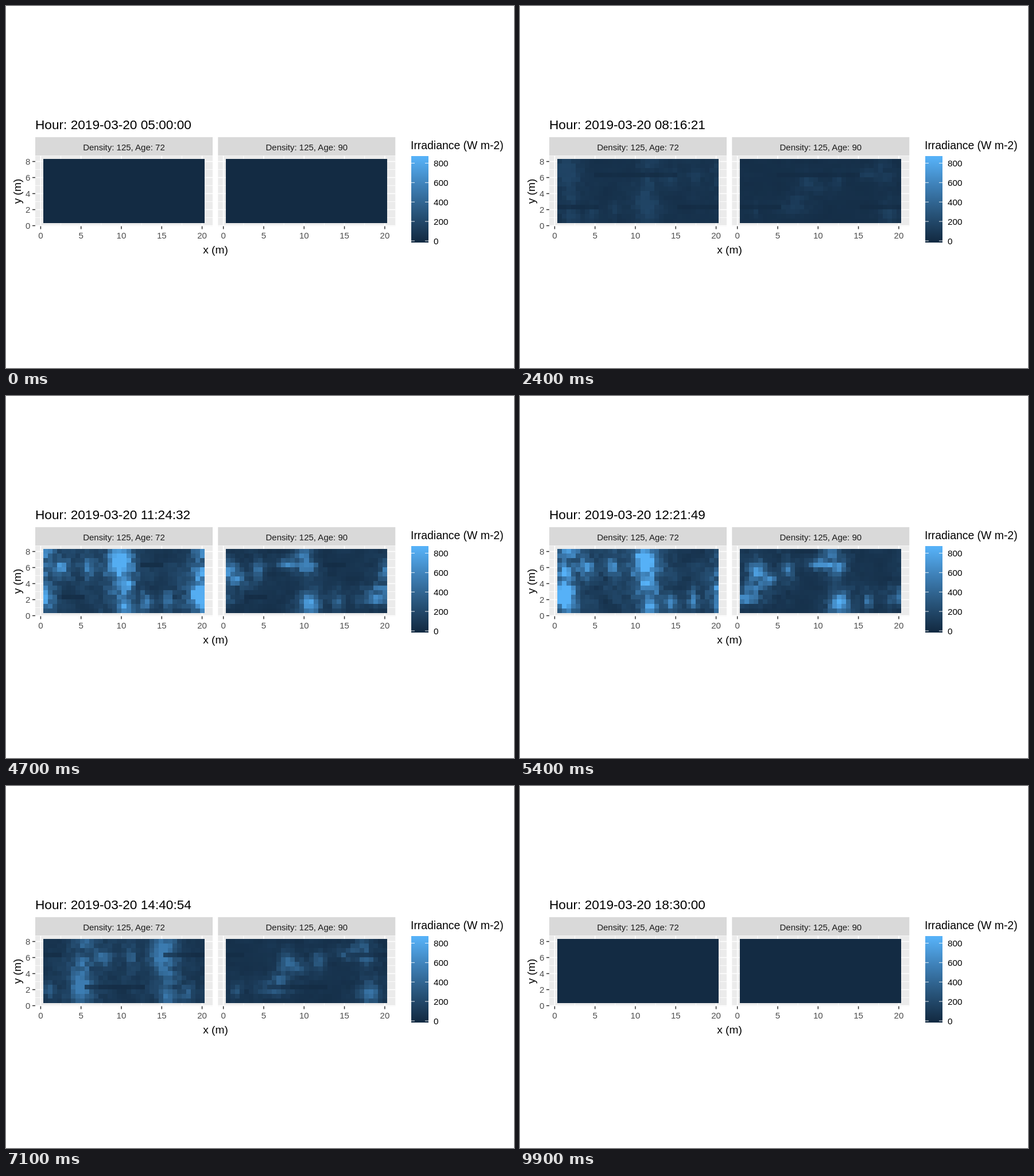
Recreate the animation shown at these times as an HTML page with a canvas. Size 885 by 632 pixels, loop 10000 ms.

```html
<!DOCTYPE html>
<html lang="en">
<head>
<meta charset="utf-8">
<title>Irradiance by hour</title>
<style>
  html, body { margin: 0; width: 100%; height: 100%; overflow: hidden; background: #fff; }
  svg, canvas { position: absolute; }
  svg { left: 0; top: 0; font-family: "Liberation Sans", Arial, sans-serif; }
  canvas { top: 267px; width: 281px; height: 112px; image-rendering: pixelated; }
  #young { left: 65px; }
  #old { left: 383px; }
  .tick { font-size: 15.1px; fill: #4d4d4d; }
  .strip { font-size: 15px; fill: #1a1a1a; }
  .key { font-size: 15.3px; }
  .label { font-size: 19.2px; }
  .mid { text-anchor: middle; }
  .end { text-anchor: end; }
</style>
</head>
<body>
<svg id="plot" width="885" height="632" viewBox="0 0 885 632">
  <defs>
    <linearGradient id="ramp" x1="0" y1="1" x2="0" y2="0">
      <stop offset="0.02" stop-color="#132b43"/>
      <stop offset="0.34" stop-color="#28547a"/>
      <stop offset="0.66" stop-color="#3e80b7"/>
      <stop offset="0.98" stop-color="#56b1f7"/>
    </linearGradient>
  </defs>
  <text id="clock" x="51" y="214.6" font-size="22.65"></text>
  <text class="label mid" x="365" y="432">x (m)</text>
  <text class="label mid" transform="translate(25.5 323.5) rotate(-90)">y (m)</text>
  <text class="label" x="705" y="250" style="font-size:19.4px">Irradiance (W m-2)</text>
  <rect x="706" y="262" width="30" height="151" fill="url(#ramp)"/>
</svg>
<canvas id="young" width="35" height="14"></canvas>
<canvas id="old" width="35" height="14"></canvas>
<script>
const COLS = 35, ROWS = 14, SPAN = 20, CELL = SPAN / COLS, EDGE = 0.333, MAX = 855;
const FRAMES = 100, STEP = 100, DAY_START = 5 * 3600, DAY_SPAN = 13.5 * 3600, NOON = 12.3;
const plot = document.getElementById('plot');
const clock = document.getElementById('clock');

function add(tag, attrs, text) {
  const el = document.createElementNS('http://www.w3.org/2000/svg', tag);
  for (const name in attrs) el.setAttribute(name, attrs[name]);
  if (text !== undefined) el.textContent = text;
  plot.append(el);
}
const box = (x, y, width, height, fill) => add('rect', { x, y, width, height, fill });
const line = (x1, y1, x2, y2, stroke, width) =>
  add('line', { x1, y1, x2, y2, stroke, 'stroke-width': width });

function drawPanel(left, title) {
  const px = x => left + 9.4 + 14.06 * x;
  const py = y => 383.5 - 14 * y;
  box(left, 229, 309, 32, '#d9d9d9');
  add('text', { class: 'strip mid', x: left + 154.5, y: 251.5 }, title);
  box(left, 261.5, 309, 123, '#ebebeb');
  for (let x = 2.5; x < 20; x += 5) line(px(x), 261.5, px(x), 384.5, '#fff', 0.8);
  for (let y = 1; y < 8; y += 2) line(left, py(y), left + 309, py(y), '#fff', 0.8);
  for (let y = 0; y <= 8; y += 2) line(left, py(y), left + 309, py(y), '#fff', 1.6);
  for (let x = 0; x <= 20; x += 5) {
    line(px(x), 261.5, px(x), 384.5, '#fff', 1.6);
    line(px(x), 384.5, px(x), 389.5, '#333', 1.5);
    add('text', { class: 'tick mid', x: px(x), y: 406 }, x);
  }
}

drawPanel(51, 'Density: 125, Age: 72');
drawPanel(369.3, 'Density: 125, Age: 90');
for (let y = 0; y <= 8; y += 2) {
  const py = 383.5 - 14 * y;
  line(46, py, 51, py, '#333', 1.5);
  add('text', { class: 'tick end', x: 42.5, y: py + 5.5 }, y);
}
for (let v = 0; v <= 800; v += 200) {
  const py = 410 - v * 0.1695;
  line(706, py, 712, py, '#fff', 0.9);
  line(730, py, 736, py, '#fff', 0.9);
  add('text', { class: 'key', x: 745, y: py + 5.6 }, v);
}

// Canopy openings as lit at noon: x, y, half width, half height in metres.
// Taller trees make the light travel faster over the ground.
const stands = [
  { id: 'young', speed: 5.5, diffuse: 50, leak: 0.2, gaps: [
    [11.2, 6.7, 1.1, 1.6], [1.1, 2.5, 1.1, 1.5], [11.7, 1.3, .8, .9], [11.8, 3.8, .8, .6],
    [1.7, 7.8, 1.1, .5], [1.2, 5.5, .6, .8], [3.9, 6, .7, .8], [7.2, 6, .5, .9],
    [14.3, 1.7, .5, .8], [17.1, 2, .4, .9]] },
  { id: 'old', speed: 7.8, diffuse: 35, leak: 0.1, gaps: [
    [2.4, 5.5, .8, .9], [3.8, 4.6, .7, .5], [1.4, 3.3, .9, .4], [.9, 2.1, 1.3, .5],
    [10, 6.4, 1.2, .4], [11.6, 7.7, .8, .5], [12.3, 6.1, .8, .6], [12.5, 1.5, .9, 1],
    [6.2, 5.8, .5, .8], [16, 1.8, .4, .7]] }
];
const trunks = [{ x: 5.2, row: 10 }, { x: 15, row: 3 }];

const wrap = d => d - SPAN * Math.round(d / SPAN);
const mod = (a, n) => (a % n + n) % n;
const lerp = (a, b, t) => a + (b - a) * t;

function noise(a, b, seed) {
  const n = Math.sin(a * 12.99 + b * 78.23 + seed * 37.7) * 43758.5453;
  return n - Math.floor(n);
}
// Smooth noise that repeats with the plot width.
function cloud(x, y, seed) {
  const u = x / 1.25, v = y / 0.9, i = Math.floor(u), j = Math.floor(v);
  const at = (a, b) => noise(mod(a, 16), b, seed);
  return lerp(lerp(at(i, j), at(i + 1, j), u - i),
              lerp(at(i, j + 1), at(i + 1, j + 1), u - i), v - j);
}

function sunAt(hour) {
  const angle = (hour - NOON) * Math.PI / 12;
  const height = hour > 17.2 ? 0 : Math.max(0, Math.cos(angle));
  return { height, slope: Math.tan(Math.max(-1.13, Math.min(1.13, angle))) };
}

function gapLight([gx, gy, w, h], x, y, rough) {
  const r = Math.hypot(wrap(x - gx) / w, (y - gy) / h) * rough;
  return 0.8 * Math.sqrt(w * h) * (Math.exp(-r * r) + 0.25 * Math.exp(-r * r / 4));
}

// Trunks cast a thin shadow away from the sun.
function shade(x, row, slope) {
  const length = Math.min(10, Math.abs(slope) * 10.5);
  const hit = t => t.row === row && mod((x - t.x) * Math.sign(slope), SPAN) < length;
  return trunks.some(hit) ? 0.3 : 1;
}

function irradiance(stand, seed, col, row, sun) {
  const x = EDGE + (col + 0.5) * CELL, y = EDGE + (ROWS - row - 0.5) * CELL;
  const origin = x - stand.speed * sun.slope;
  const grain = noise(col, row, seed);
  let open = stand.leak * cloud(origin, y, seed) ** 2;
  for (const gap of stand.gaps) open += gapLight(gap, origin, y, 0.7 + 0.4 * grain);
  const direct = 850 * sun.height ** 2.6 * Math.min(1, open);
  const diffuse = stand.diffuse * Math.sqrt(sun.height) * (0.6 + 0.8 * cloud(x, y, seed + 3));
  return (direct + diffuse) * shade(x, row, sun.slope);
}

const stops = [[19, 43, 67], [40, 84, 122], [62, 128, 183], [86, 177, 247]];
function colour(value) {
  const p = Math.max(0, Math.min(1, value / MAX)) * 3;
  const i = Math.min(2, Math.floor(p));
  return `rgb(${stops[i].map((c, n) => Math.round(lerp(c, stops[i + 1][n], p - i)))})`;
}

for (const stand of stands) stand.ctx = document.getElementById(stand.id).getContext('2d');
function drawStand(stand, seed, sun) {
  for (let row = 0; row < ROWS; row++) {
    for (let col = 0; col < COLS; col++) {
      stand.ctx.fillStyle = colour(irradiance(stand, seed, col, row, sun));
      stand.ctx.fillRect(col, row, 1, 1);
    }
  }
}

const two = n => String(Math.floor(n)).padStart(2, '0');
let shown = -1;
function tick() {
  const frame = Math.floor(performance.now() / STEP) % FRAMES;
  if (frame !== shown) {
    shown = frame;
    const sec = DAY_START + frame * DAY_SPAN / (FRAMES - 1);
    clock.textContent = `Hour: 2019-03-20 ${two(sec / 3600)}:${two(sec / 60 % 60)}:${two(sec % 60)}`;
    const sun = sunAt(sec / 3600);
    stands.forEach((stand, i) => drawStand(stand, i + 1, sun));
  }
  requestAnimationFrame(tick);
}
tick();
</script>
</body>
</html>
```
